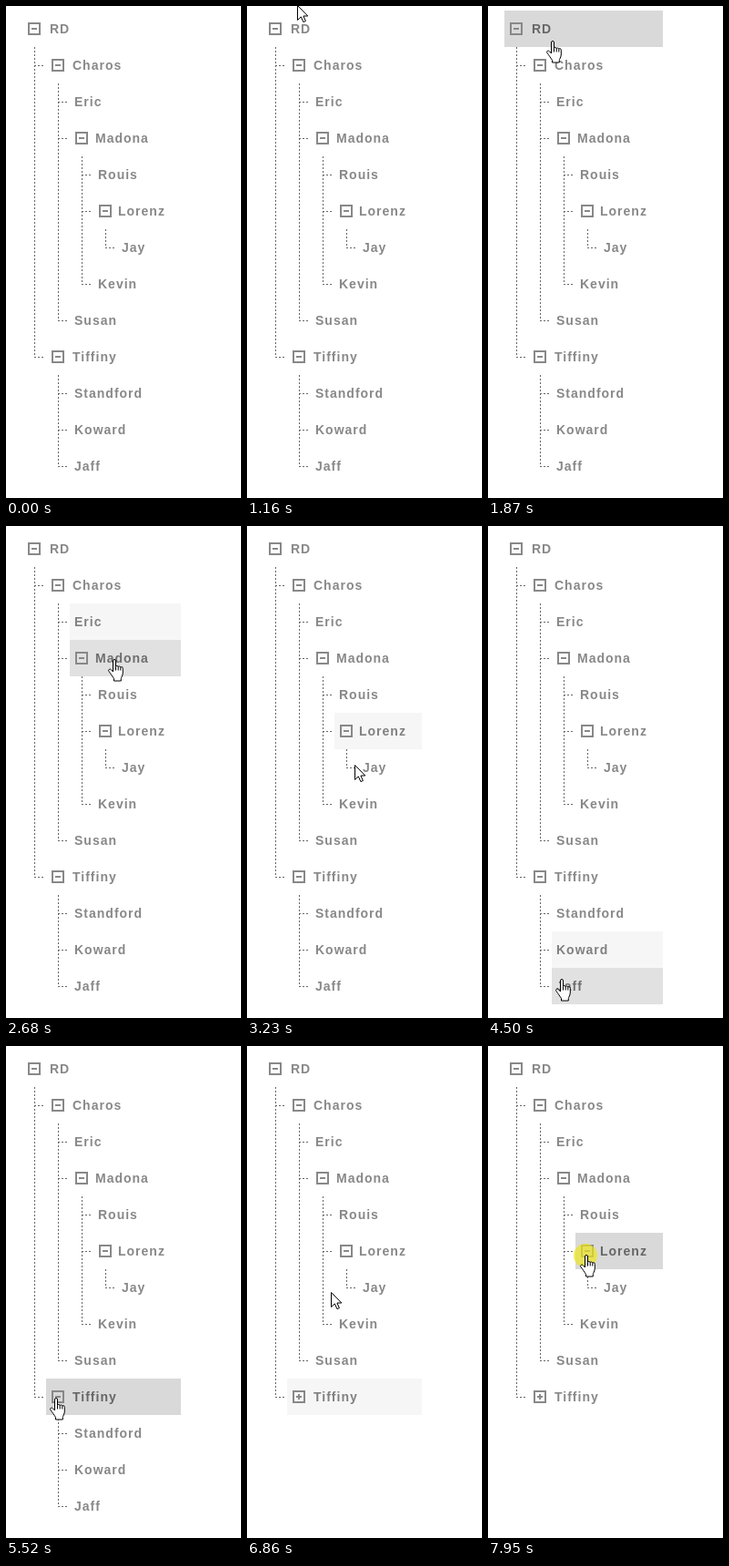
Recreate the animation shown at these times as an HTML page with a canvas. Size 258 by 540 pixels, loop 8000 ms.

```html
<!DOCTYPE html>
<html lang="en">
<head>
<meta charset="utf-8">
<title>Tree view</title>
<style>
html, body { margin: 0; width: 100%; height: 100%; overflow: hidden; background: #fff; }
canvas { display: block; width: 258px; height: 540px; }
</style>
</head>
<body>
<canvas id="stage" width="258" height="540"></canvas>
<script>
const LOOP = 8000, TICK = 78.7, OFFSET = 22;
const ROW = 40, TOP = 5, RIGHT = 192, INDENT = 26;
const COLLAPSE = 73;
const ctx = document.getElementById('stage').getContext('2d');

// label, depth
const rows = [
  ['RD', 0], ['Charos', 1], ['Eric', 2], ['Madona', 2], ['Rouis', 3], ['Lorenz', 3], ['Jay', 4],
  ['Kevin', 3], ['Susan', 2], ['Tiffiny', 1], ['Standford', 2], ['Koward', 2], ['Jaff', 2]
].map(([label, depth], i) => ({ label, depth, left: 18 + INDENT * depth, top: TOP + ROW * i }));
rows.forEach((row, i) => {
  row.kids = [];
  for (let j = i + 1; j < rows.length && rows[j].depth > row.depth; j++) {
    if (rows[j].depth === row.depth + 1) row.kids.push(rows[j]);
  }
});
const folder = rows[9];

// pointer path: tick, x, y
const path = [
  [5, 197, 525], [8, 193, 110], [9, 140, 1], [10, 53, -6], [14, 53, -6],
  [24, 70, 39], [32, 110, 123], [34, 118, 147], [35, 119, 158],
  [41, 118, 262], [45, 100, 360], [52, 88, 482], [55, 88, 482],
  [57, 80, 498], [60, 80, 498], [68, 58, 402], [70, 54, 387], [85, 54, 387],
  [86, 66, 340], [87, 92, 270], [88, 110, 238], [90, 123, 225], [96, 123, 225], [99, 107, 230]
];
const clickAlpha = { 72: 1, 73: 1, 74: 0.5, 101: 1 };

const arrow = new Path2D('M.5 .5V16.5L4.3 12.9L6.9 18.6L9.4 17.5L6.9 12H11.8z');
const hand = new Path2D('M5.5 14V2q0-1.5 1.5-1.5T8.5 2V8.5q0-1 1.3-1t1.4 1.2q.2-.8 1.3-.7' +
  't1.3 1.3q.2-.7 1.3-.6t1.2 1.6V15q0 2-1 4t-1 2.5V24H6.5V21.5q-1-1.5-2.5-3.7' +
  'T1 13.5q-1-1.5 .3-2.2t2.4 .7z');
const knuckles = new Path2D('M8.5 8.5V12.5M11.2 8.7V12.5M13.8 9.3V12.5');

function pointerAt(k) {
  if (k < path[0][0]) return null;
  const n = path.findIndex(p => p[0] > k);
  const b = n < 0 ? path[path.length - 1] : path[n];
  const a = n < 0 ? b : path[n - 1];
  const u = a === b ? 0 : (k - a[0]) / (b[0] - a[0]);
  return { x: Math.round(a[1] + (b[1] - a[1]) * u), y: Math.round(a[2] + (b[2] - a[2]) * u) };
}

function isShown(row, k) {
  return k < COLLAPSE || !folder.kids.includes(row);
}

function hoverAt(k) {
  const p = pointerAt(k);
  return p && rows.find(r => isShown(r, k) && p.x >= r.left && p.x < RIGHT &&
    p.y >= r.top && p.y < r.top + ROW);
}

// The hover colour trails the pointer by about two ticks.
function glow(row, k) {
  return (hoverAt(k - 1) === row ? 0.77 : 0) + (hoverAt(k - 2) === row ? 0.23 : 0);
}

function dots(x1, y1, x2, y2) {
  ctx.beginPath();
  ctx.moveTo(x1, y1);
  ctx.lineTo(x2, y2);
  ctx.stroke();
}

function drawLines(row) {
  const x = row.left + 13.5;
  const last = row.kids[row.kids.length - 1];
  ctx.strokeStyle = '#666';
  ctx.lineWidth = 1;
  ctx.setLineDash([2, 2]);
  dots(x, row.top + ROW, x, last.top + 20);
  row.kids.forEach(kid => dots(row.left + 13, kid.top + 20.5, row.left + 23, kid.top + 20.5));
  ctx.setLineDash([]);
}

function drawIcon(row, closed) {
  const x = row.left + 13, y = row.top + 20;
  ctx.strokeStyle = ctx.fillStyle = '#888';
  ctx.lineWidth = 2;
  ctx.strokeRect(x - 6, y - 6, 12, 12);
  ctx.fillRect(x - 3, y - 1, 6, 2);
  if (closed) ctx.fillRect(x - 1, y - 3, 2, 6);
}

function drawRow(row, k) {
  const v = glow(row, k);
  const closed = row === folder && k >= COLLAPSE;
  const parent = row.kids.length > 0;
  if (v) {
    ctx.globalAlpha = v;
    ctx.fillStyle = '#d9d9d9';
    ctx.fillRect(row.left, row.top, RIGHT - row.left, ROW);
    ctx.globalAlpha = 1;
  }
  if (parent) {
    drawIcon(row, closed);
    if (!closed) drawLines(row);
  }
  const shade = Math.round(136 - 34 * v);
  ctx.fillStyle = `rgb(${shade},${shade},${shade})`;
  ctx.fillText(row.label, row.left + (parent ? 30 - row.depth : 5), row.top + 25);
}

function drawPointer(k) {
  const p = pointerAt(k);
  if (!p) return;
  if (clickAlpha[k]) {
    ctx.fillStyle = `rgba(236,230,30,${0.7 * clickAlpha[k]})`;
    ctx.beginPath();
    ctx.arc(p.x, p.y, 13, 0, 2 * Math.PI);
    ctx.fill();
  }
  const over = hoverAt(k);
  const shape = over ? hand : arrow;
  ctx.save();
  ctx.translate(p.x - (over ? 6 : 0), p.y - (over ? 1 : 0));
  ctx.fillStyle = '#fff';
  ctx.strokeStyle = '#000';
  ctx.lineWidth = 1;
  ctx.fill(shape);
  ctx.stroke(shape);
  if (over) ctx.stroke(knuckles);
  ctx.restore();
}

function draw(now) {
  const k = Math.floor((now % LOOP + OFFSET) / TICK);
  ctx.fillStyle = '#fff';
  ctx.fillRect(0, 0, 258, 540);
  ctx.font = 'bold 14px "Liberation Sans", Arial, sans-serif';
  ctx.letterSpacing = '1px';
  rows.filter(r => isShown(r, k)).forEach(r => drawRow(r, k));
  drawPointer(k);
}

const start = performance.now();
function frame() {
  draw(performance.now() - start);
  requestAnimationFrame(frame);
}
frame();
</script>
</body>
</html>
```
